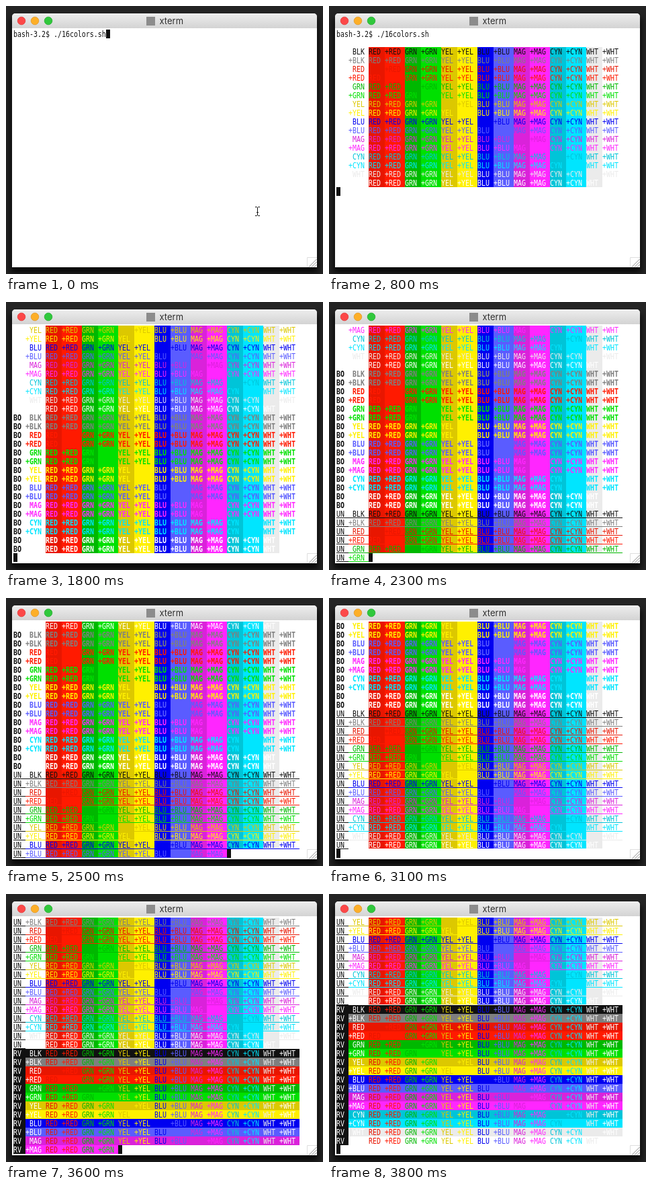
An HTML page for the animation above (4.4 s loop, 472 by 398 pixels).

```html
<!DOCTYPE html>
<html lang="en">
<head>
<meta charset="utf-8">
<title>xterm colours</title>
<style>
  html, body { margin: 0; width: 100%; height: 100%; overflow: hidden; background: #222; }
  svg { display: block; width: 472px; height: 398px; }
  .term text { font: 9.97px "DejaVu Sans Mono", monospace; white-space: pre; }
  .term text.bold { font-weight: bold; }
  .term rect { shape-rendering: crispEdges; }
  .title { font: 13px Inter, sans-serif; fill: #303030; }
</style>
</head>
<body>
<svg viewBox="0 0 472 398" xmlns="http://www.w3.org/2000/svg">
  <defs>
    <linearGradient id="bar" x2="0" y2="1">
      <stop offset="0" stop-color="#eeeeee"/>
      <stop offset="1" stop-color="#d3d3d3"/>
    </linearGradient>
    <filter id="blur" x="-10%" y="-10%" width="120%" height="120%">
      <feGaussianBlur stdDeviation="5"/>
    </filter>
    <clipPath id="screen"><rect x="9" y="35" width="454" height="351"/></clipPath>
  </defs>

  <rect width="472" height="398" fill="#242424"/>
  <rect x="7" y="18" width="458" height="378" fill="#000" opacity=".8" filter="url(#blur)"/>
  <path d="M9 388V16a5 5 0 0 1 5-5H458a5 5 0 0 1 5 5V388Z" fill="#fff"/>
  <path d="M9 33V16a5 5 0 0 1 5-5H458a5 5 0 0 1 5 5V33Z" fill="url(#bar)"/>
  <g stroke-width=".8">
    <circle cx="23" cy="22" r="5.8" fill="#fc4848" stroke="#e23b3b"/>
    <circle cx="43" cy="22" r="5.8" fill="#fdaf28" stroke="#e0982a"/>
    <circle cx="63" cy="22" r="5.8" fill="#30c83c" stroke="#27ac30"/>
  </g>
  <rect x="209" y="16" width="13" height="13" fill="#8c8c8c"/>
  <text class="title" x="228.5" y="27">xterm</text>

  <g class="term" clip-path="url(#screen)">
    <g id="lines"></g>
    <rect id="cursor" width="6" height="13" fill="#111"/>
  </g>

  <path d="M448.5 388V373.5H463" fill="none" stroke="#dedede"/>
  <path d="M451 387.5L462.5 376M455 387.5L462.5 380M459 387.5L462.5 384" stroke="#8a8a8a" fill="none"/>
  <path id="pointer" d="M371 298.5H373.5L374.5 299.5L375.5 298.5H378M374.5 299V311M371 311.5H373.5L374.5 310.5L375.5 311.5H378M373 306.5H376"
        stroke="#111" fill="none"/>
</svg>

<script>
const LOOP = 4400, STEP = 100;
const LEFT = 11, TOP = 35, CELL_W = 6, CELL_H = 13, ROWS = 27;
const TALL = 1.23; // the terminal face is taller than the outline font
const INK = '#111', PAPER = '#fff';
const PROMPT = 'bash-3.2$ ./16colors.sh';
const FIRST_LINE = 2, PIECES = 16;

// name, normal colour, bright colour
const COLORS = [
  ['BLK', INK, '#7f7f7f'],
  ['RED', '#e81600', '#ff1a00'],
  ['GRN', '#00b800', '#00e000'],
  ['YEL', '#dcc800', '#fff000'],
  ['BLU', '#0000f0', '#5a5cff'],
  ['MAG', '#da22da', '#ff26ff'],
  ['CYN', '#00c4d8', '#00e5ff'],
  ['WHT', '#ebebeb', '#ffffff'],
];
const SHADES = COLORS.flatMap(([name, normal, bright]) => [
  { name, color: normal, bright, plus: false },
  { name, color: bright, bright, plus: true },
]);
const STYLES = ['', 'BO', 'UN', 'RV'];

// pieces printed so far at each time, 256 to a block; -1 is the waiting prompt
const PROGRESS = [
  [0, -1], [300, -1], [400, 0], [800, 256], [1000, 256], [1100, 268], [1800, 512],
  [2200, 512], [2300, 594], [2500, 668], [2800, 768], [3100, 768],
  [3400, 875], [3800, 1024], [LOOP, 1024],
];

const byId = id => document.getElementById(id);
const lines = byId('lines'), cursor = byId('cursor'), pointer = byId('pointer');

function add(parent, tag, attrs, text) {
  const node = document.createElementNS('http://www.w3.org/2000/svg', tag);
  for (const key in attrs) node.setAttribute(key, attrs[key]);
  if (text) node.textContent = text;
  return parent.appendChild(node);
}

function addPiece(line, col, text, fg, bg, style) {
  const piece = add(lines, 'g', {
    transform: `translate(${LEFT + col * CELL_W} ${TOP + line * CELL_H})`,
  });
  const width = text.length * CELL_W;
  if (style === 'RV') [fg, bg] = [bg, fg];
  if (bg !== PAPER) add(piece, 'rect', { width, height: CELL_H, fill: bg });
  if (fg !== bg) {
    add(piece, 'text', {
      y: 11 / TALL, transform: `scale(1 ${TALL})`, fill: fg,
      class: style === 'BO' ? 'bold' : 'plain',
    }, text);
  }
  if (style === 'UN') add(piece, 'rect', { y: 12, width, height: 1, fill: fg });
  return piece;
}

function buildLine(line, style, shade) {
  const fg = style === 'BO' ? shade.bright : shade.color;
  const parts = [
    [style.padEnd(3), INK, PAPER],
    [(shade.plus ? '+' : ' ') + shade.name + ' ', fg, PAPER],
    ...SHADES.slice(2).map(s => [(s.plus ? '+' : '') + s.name + ' ', fg, s.color]),
  ];
  let col = 0;
  return parts.map(([text, ink, paper]) => {
    const start = col;
    col += text.length;
    return { start, node: addPiece(line, start, text, ink, paper, style) };
  });
}

addPiece(0, 0, PROMPT, INK, PAPER, '');
const pieces = STYLES.flatMap((style, block) =>
  SHADES.flatMap((shade, i) =>
    buildLine(FIRST_LINE + block * SHADES.length + i, style, shade)));

function printedAt(time) {
  const i = PROGRESS.findIndex(([at]) => at > time);
  const [t0, n0] = PROGRESS[i - 1], [t1, n1] = PROGRESS[i];
  return Math.round(n0 + (n1 - n0) * (time - t0) / (t1 - t0));
}

function render(time) {
  const printed = printedAt(time);
  const waiting = printed < 0;
  const line = waiting ? 0 : FIRST_LINE + Math.floor(printed / PIECES);
  const col = waiting ? PROMPT.length : printed < pieces.length ? pieces[printed].start : 0;
  const scroll = Math.max(0, line - ROWS + 1);

  pieces.forEach(({ node }, i) => node.setAttribute('display', i < printed ? 'inline' : 'none'));
  lines.setAttribute('transform', `translate(0 ${-scroll * CELL_H})`);
  cursor.setAttribute('x', LEFT + col * CELL_W);
  cursor.setAttribute('y', TOP + (line - scroll) * CELL_H);
  pointer.setAttribute('display', waiting ? 'inline' : 'none');
}

const begin = performance.now();
let shown = -1;
function tick() {
  const elapsed = (performance.now() - begin) % LOOP;
  const time = Math.floor(elapsed / STEP) * STEP;
  if (time !== shown) render(shown = time);
  requestAnimationFrame(tick);
}
tick();
</script>
</body>
</html>
```
